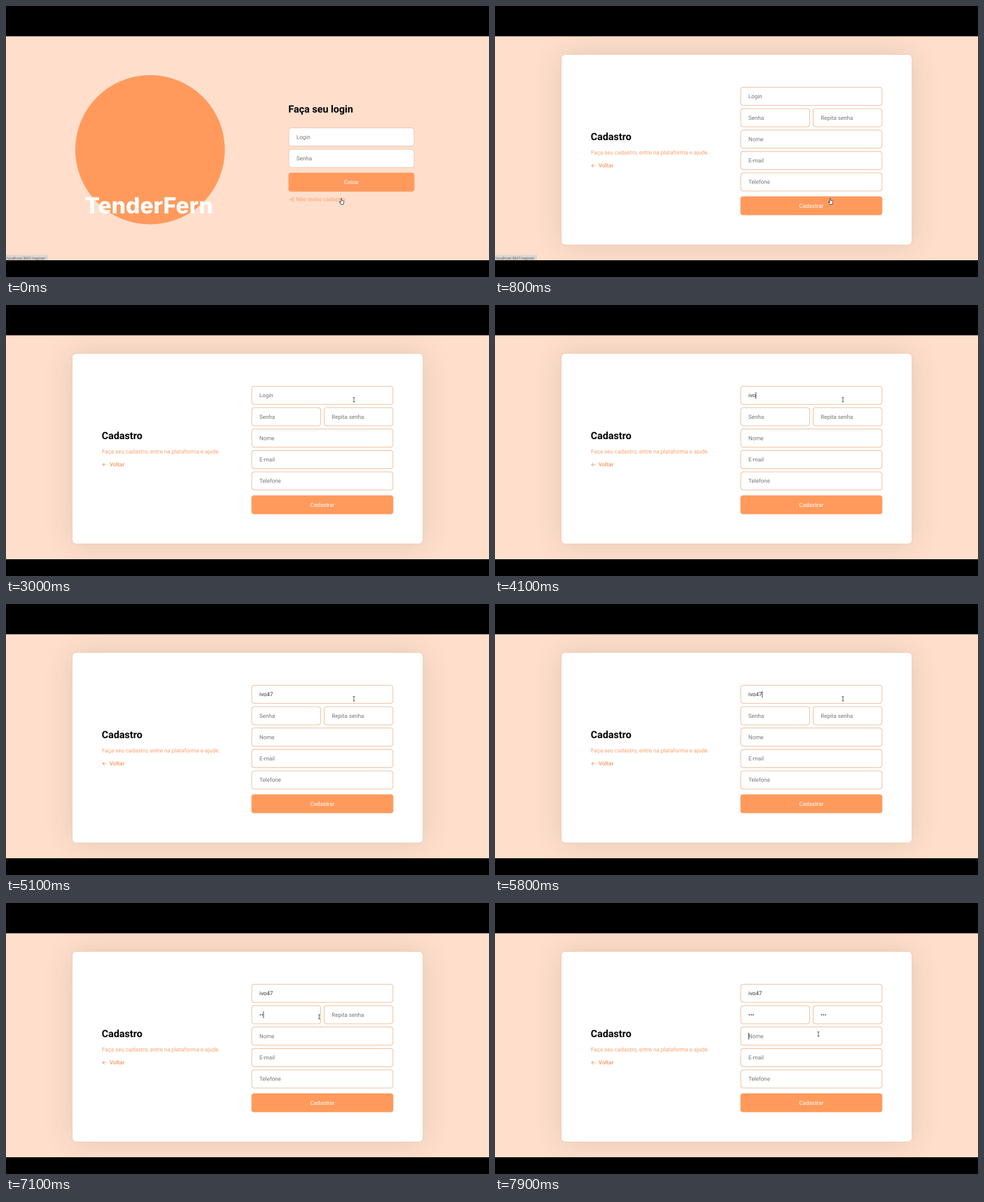
An HTML page with a canvas for the animation above (8 s loop, 690 by 388 pixels).

```html
<!DOCTYPE html>
<html lang="pt">
<head>
<meta charset="utf-8">
<title>Cadastro</title>
<style>
html, body { margin: 0; width: 100%; height: 100%; overflow: hidden; background: #000; }
canvas { display: block; width: 100vw; height: 100vh; }
</style>
</head>
<body>
<canvas id="stage"></canvas>
<script>
const W = 690, H = 388, LOOP = 8000, STEP = 100, BLINK = 500;
const canvas = document.getElementById('stage');
const ctx = canvas.getContext('2d');

// Twice the screen density keeps small text and thin borders smooth
const scale = 2 * (window.devicePixelRatio || 1);
canvas.width = W * scale;
canvas.height = H * scale;
ctx.textRendering = 'geometricPrecision';

const ORANGE = '#ff9a5c', PEACH = '#ffdfcc', GREY = '#757575', DARK = '#333';
const FAMILY = 'Roboto, sans-serif';
const BODY = '8px ' + FAMILY, MEDIUM = '500 ' + BODY, TITLE = 'bold 14.3px ' + FAMILY;
const PAGE_TOP = 43.4, PAGE_BOTTOM = 364;
const BOX_H = 27, PITCH = 30.65, GAP = 3.9;

// Stacks boxes in a column; a row may hold several side by side
function column(x, y, w, rows) {
  return rows.flatMap((hints, i) => {
    const cell = (w - GAP * (hints.length - 1)) / hints.length;
    return hints.map((hint, k) => ({ hint, x: x + k * (cell + GAP), y: y + i * PITCH, w: cell, h: BOX_H }));
  });
}

// The submit button sits slightly below the last row
function buttonBelow(fields, label) {
  const last = fields[fields.length - 1];
  return { ...last, label, y: last.y + PITCH + GAP - 0.4 };
}

const loginFields = column(403.5, 174, 180, [['Login'], ['Senha']]);
const loginButton = buttonBelow(loginFields, 'Entrar');
const formFields = column(350.6, 115.8, 202.7,
  [['Login'], ['Senha', 'Repita senha'], ['Nome'], ['E-mail'], ['Telefone']]);
const formButton = buttonBelow(formFields, 'Cadastrar');
const [user, pass, repeat, fullName] = formFields;

// Each action focuses a field and types its text, one key every so often
const actions = [
  { at: 1500, field: user, text: '', every: 0 },
  { at: 3800, field: user, text: 'ivo', every: 100 },
  { at: 4400, field: user, text: '47', every: 200 },
  { at: 6000, field: pass, text: '', every: 0 },
  { at: 7000, field: pass, text: '•••', every: 100 },
  { at: 7400, field: repeat, text: '', every: 0 },
  { at: 7500, field: repeat, text: '•••', every: 100 },
  { at: 7900, field: fullName, text: '', every: 0 }
];

const home = { x: 479, y: 275.5 };
const moves = [
  { from: 800, to: 1500, x: 413, y: 123.5 },
  { from: 1600, to: 1800, x: 528, y: 133 },
  { from: 1800, to: 1900, x: 497, y: 135.7 },
  { from: 5800, to: 6200, x: 447.5, y: 163 },
  { from: 7200, to: 7400, x: 508, y: 163 },
  { from: 7600, to: 7800, x: 462, y: 187.7 }
];

const ease = k => k * k * (3 - 2 * k);

function pointerAt(t) {
  return moves.reduce((p, m) => {
    const k = ease(Math.min(1, Math.max(0, (t - m.from) / (m.to - m.from))));
    return { x: p.x + (m.x - p.x) * k, y: p.y + (m.y - p.y) * k };
  }, home);
}

const typed = (a, t) => t < a.at ? '' : a.text.slice(0, a.every ? Math.floor((t - a.at) / a.every) + 1 : 0);
const valueOf = (field, t) => actions.filter(a => a.field === field).map(a => typed(a, t)).join('');

function text(str, x, y, color, font = BODY, align = 'left') {
  ctx.font = font;
  ctx.fillStyle = color;
  ctx.textAlign = align;
  ctx.fillText(str, x, y);
}

function trace(points) {
  points.forEach(([x, y], i) => i ? ctx.lineTo(x, y) : ctx.moveTo(x, y));
}

function line(color, ...runs) {
  ctx.strokeStyle = color;
  ctx.lineWidth = 0.8;
  ctx.beginPath();
  runs.forEach(trace);
  ctx.stroke();
}

function panel(b, radius, fill, border) {
  const inset = border ? 0.5 : 0;
  ctx.beginPath();
  ctx.roundRect(b.x + inset, b.y + inset, b.w - 2 * inset, b.h - 2 * inset, radius);
  ctx.fillStyle = fill;
  ctx.fill();
  if (!border) return;
  ctx.strokeStyle = border;
  ctx.lineWidth = 0.9;
  ctx.stroke();
}

const baseline = b => b.y + b.h / 2 + 2.8;

function drawField(f, value, border) {
  panel(f, 3.4, '#fff', border);
  text(value || f.hint, f.x + 11.4, baseline(f), value ? DARK : GREY);
}

function drawButton(b) {
  panel(b, 3.6, ORANGE);
  text(b.label, b.x + b.w / 2, baseline(b), '#fff', BODY, 'center');
}

function drawLogin() {
  ctx.fillStyle = ORANGE;
  ctx.beginPath();
  ctx.arc(205.8, 205.8, 106.8, 0, Math.PI * 2);
  ctx.fill();
  text('TenderFern', 204, 297, '#fff', '800 32px Inter, sans-serif', 'center');
  text('Faça seu login', 403.4, 152.4, '#000', TITLE);
  for (const f of loginFields) drawField(f, '', '#e8c8b2');
  drawButton(loginButton);
  const link = '#fdac7e';
  line(link, [[404.8, 277], [409, 277]], [[407.2, 275.2], [409, 277], [407.2, 278.8]],
    [[408.5, 274.2], [411, 274.2], [411, 279.8], [408.5, 279.8]]);
  text('Não tenho cadastro', 414.2, 279.7, link, MEDIUM);
}

function drawCaret(t) {
  const past = actions.filter(a => t >= a.at);
  if (!past.length) return;
  const { field, at, every, text: keys } = past[past.length - 1];
  const lastKey = at + every * Math.max(0, keys.length - 1);
  if (t > lastKey && Math.floor((t - lastKey) / BLINK) % 2) return;
  ctx.font = BODY;
  const x = field.x + 11.9 + ctx.measureText(valueOf(field, t)).width;
  line('#222', [[x, field.y + 8.8], [x, field.y + 18.4]]);
}

function drawForm(t) {
  const card = { x: 93.8, y: 68.7, w: 502.6, h: 274 };
  ctx.save();
  ctx.shadowColor = 'rgba(0,0,0,0.11)';
  ctx.shadowBlur = 44 * scale;
  panel(card, 6, '#fff');
  ctx.restore();
  panel(card, 6, '#fff', '#ecbd9c');

  text('Cadastro', 136.8, 192.1, '#000', TITLE);
  text('Faça seu cadastro, entre na plataforma e ajude.', 137, 212.5, '#fb9f6b');
  line('#f89c68', [[143.2, 228.5], [138, 228.5]], [[140.5, 226], [138, 228.5], [140.5, 231]]);
  text('Voltar', 147.9, 231.2, '#f89861', MEDIUM);

  for (const f of formFields) drawField(f, valueOf(f, t), '#ecbd9c');
  drawButton(formButton);
  drawCaret(t);
}

function outline(points) {
  ctx.beginPath();
  trace(points);
  ctx.closePath();
  ctx.fillStyle = '#fff';
  ctx.strokeStyle = '#333';
  ctx.lineWidth = 0.7;
  ctx.lineJoin = 'round';
  ctx.fill();
  ctx.stroke();
}

// Hand over links and buttons, beam over fields, arrow elsewhere
function drawPointer({ x, y }, onLogin) {
  const over = b => x >= b.x && x <= b.x + b.w && y >= b.y && y <= b.y + b.h;
  ctx.save();
  ctx.translate(x, y);
  if (onLogin || over(formButton)) {
    outline([[-0.7, 0.2], [0.6, 0.2], [0.8, 3], [3.6, 3.7], [4, 4.6],
      [2.8, 8.6], [-0.6, 8.6], [-2.7, 5.3], [-2.2, 4.6], [-0.7, 5.6]]);
  } else if (formFields.some(over)) {
    line('#444', [[0, -2.6], [0, 2.6]], [[-1.4, -3], [1.4, -3]], [[-1.4, 3], [1.4, 3]]);
  } else {
    outline([[0, 0], [0, 7.6], [1.8, 6], [3, 8.6], [4.1, 8.1], [3, 5.6], [5.3, 5.5]]);
  }
  ctx.restore();
}

function drawStatus() {
  ctx.fillStyle = '#d9d5d3';
  ctx.fillRect(0, 356.5, 60, PAGE_BOTTOM - 356.5);
  text('localhost:3001/register', 1.2, 363, '#55504d', '5.2px "Open Sans", sans-serif');
}

function draw(t) {
  const onLogin = t < 800;
  ctx.setTransform(canvas.width / W, 0, 0, canvas.height / H, 0, 0);
  ctx.fillStyle = '#000';
  ctx.fillRect(0, 0, W, H);
  ctx.save();
  ctx.beginPath();
  ctx.rect(0, PAGE_TOP, W, PAGE_BOTTOM - PAGE_TOP);
  ctx.clip();
  ctx.fillStyle = PEACH;
  ctx.fillRect(0, 0, W, H);
  if (onLogin) drawLogin(); else drawForm(t);
  if (t < 1200) drawStatus();
  drawPointer(pointerAt(t), onLogin);
  ctx.restore();
}

const start = performance.now();
function tick() {
  const t = (performance.now() - start) % LOOP;
  draw(Math.floor(t / STEP) * STEP);
  requestAnimationFrame(tick);
}
tick();
</script>
</body>
</html>
```
